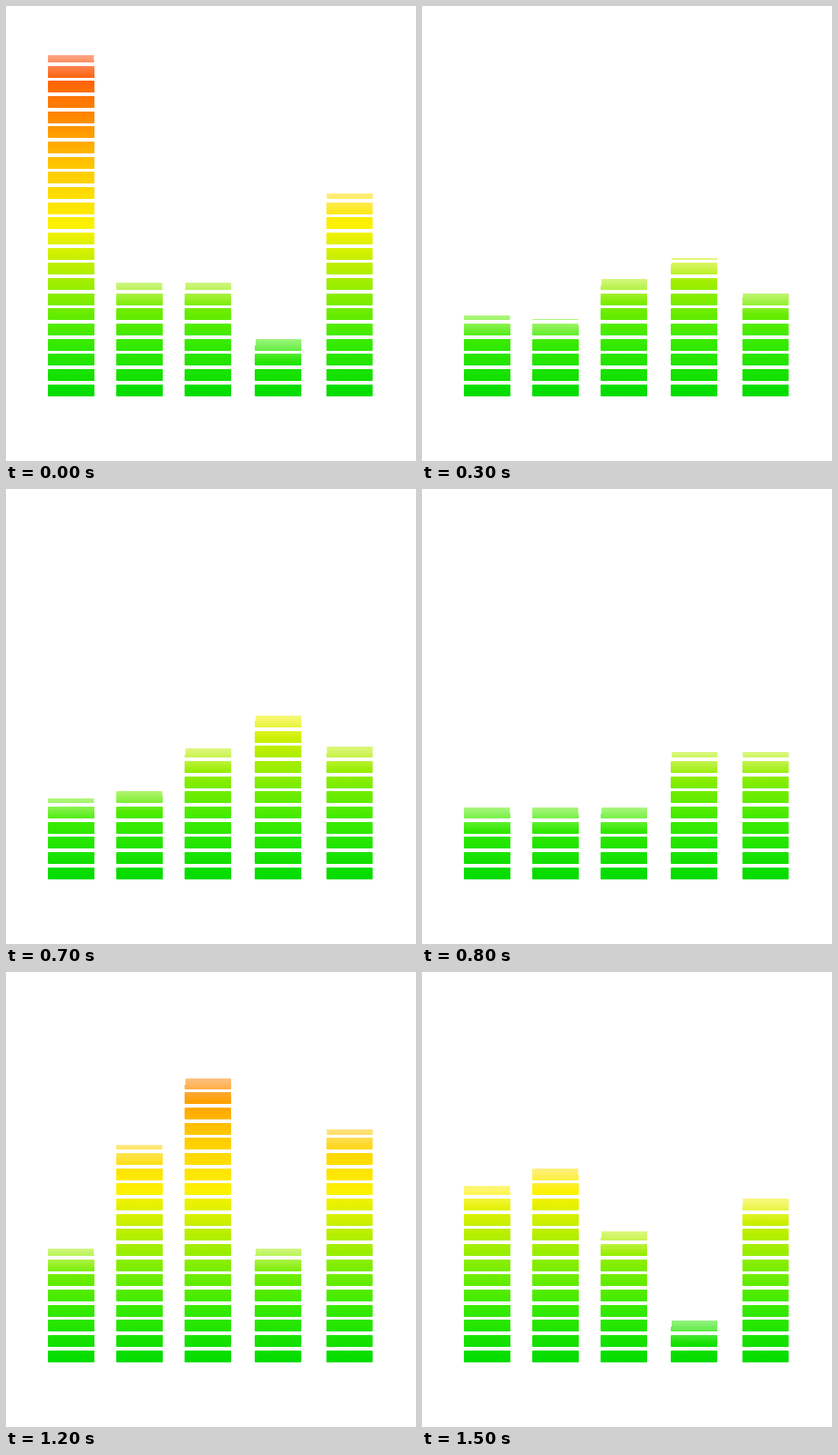
These frames come from a looping animation (450x500 px, 1600 ms). An HTML page with a canvas:

```html
<!DOCTYPE html>
<html lang="en">
<head>
<meta charset="utf-8">
<title>Equalizer</title>
<style>
  html, body { margin: 0; width: 100%; height: 100%; overflow: hidden; background: #fff; }
  canvas { display: block; width: 450px; height: 500px; }
</style>
</head>
<body>
<canvas id="stage" width="450" height="500"></canvas>
<script>
const ctx = document.getElementById('stage').getContext('2d');
const STEP = 100, STEPS = 16;
const BASE = 429, PEAK = 54;
const PITCH = 50 / 3, BAR_W = 51.3, BAR_H = 13;
const FADE = 26, TRIM = 7;
const lefts = [46, 121, 196, 273, 351.4];

// Key poses: step, then the top of each column
const poses = [
  [0, 54, 304, 304, 366, 206],
  [2, 350, 373, 373, 333, 333],
  [5, 319, 287, 155, 166, 272],
  [8, 350, 350, 350, 289, 289],
  [10, 216, 352, 300, 320, 69],
  [12, 304, 190, 117, 304, 173],
  [15, 235, 216, 285, 383, 249]
];

function gradient(y0, y1, colors) {
  const g = ctx.createLinearGradient(0, y0, 0, y1);
  colors.forEach((color, i) => g.addColorStop(i / (colors.length - 1), color));
  return g;
}

// Evenly spaced colours from green at the base to red at the peak
const ramp = gradient(BASE, PEAK,
  ['#00dc00', '#3aeb00', '#a0ee00', '#fdf200', '#ffca00', '#ff8200', '#ff4c10']);

// All columns glide linearly from pose to pose
function topsAt(step) {
  const i = poses.findLastIndex(pose => pose[0] <= step);
  const [t0, ...from] = poses[i];
  const [t1, ...to] = poses[i + 1] || [STEPS, ...poses[0].slice(1)];
  const p = (step - t0) / (t1 - t0);
  return from.map((y, c) => Math.round(y + (to[c] - y) * p));
}

function drawColumn(x, top, trimLeft) {
  ctx.save();
  // The topmost pixels are slightly narrower on one side
  ctx.beginPath();
  ctx.rect(trimLeft ? x + 1 : x, top, BAR_W - 1, TRIM);
  ctx.rect(x, top + TRIM, BAR_W, BASE);
  ctx.clip();

  ctx.fillStyle = ramp;
  ctx.beginPath();
  for (let bottom = BASE - 1 / 3; bottom > top; bottom -= PITCH)
    ctx.roundRect(x, Math.round(bottom) - BAR_H, BAR_W, BAR_H, 1);
  ctx.fill();

  ctx.fillStyle = gradient(top, top + FADE, ['rgba(255,255,255,.5)', 'rgba(255,255,255,0)']);
  ctx.fillRect(x - 1, top, BAR_W + 2, FADE);
  ctx.restore();
}

let start = null;
function draw(now) {
  start ??= now;
  const step = Math.floor((now - start) / STEP) % STEPS;
  ctx.fillStyle = '#fff';
  ctx.fillRect(0, 0, 450, 500);
  topsAt(step).forEach((top, c) => drawColumn(lefts[c], top, c > 1));
  requestAnimationFrame(draw);
}
requestAnimationFrame(draw);
</script>
</body>
</html>
```
